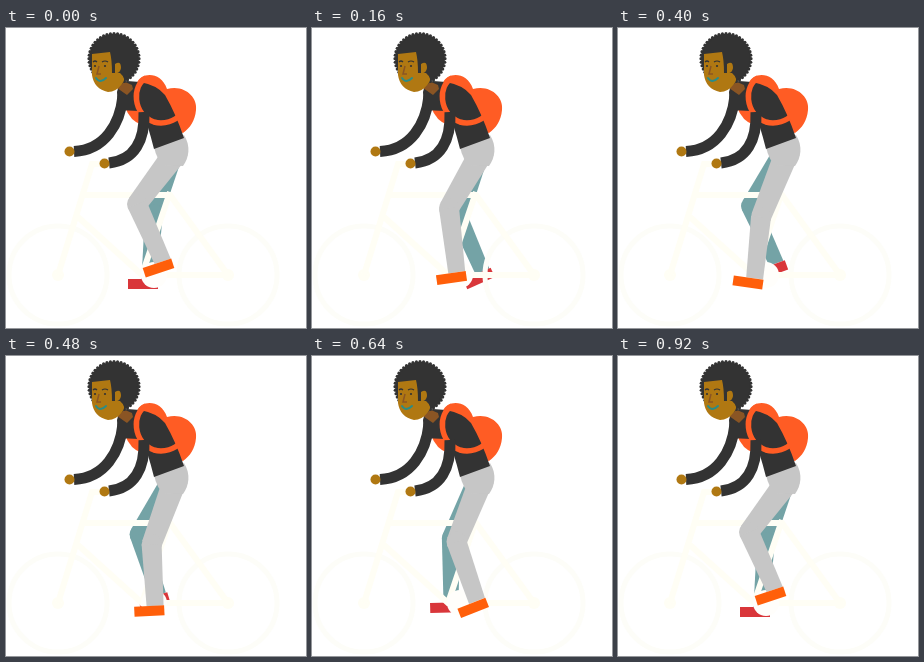
Recreate the animation shown at these times as an HTML page with a canvas. Size 300 by 300 pixels, loop 960 ms.

```html
<!DOCTYPE html>
<html lang="en">
<head>
<meta charset="utf-8">
<title>Cyclist</title>
<style>
  html, body { margin: 0; width: 100%; height: 100%; overflow: hidden; background: #fff; }
  canvas { display: block; width: 300px; height: 300px; }
</style>
</head>
<body>
<canvas id="stage" width="300" height="300"></canvas>
<script>
const ctx = document.getElementById('stage').getContext('2d');
const DARK = '#333', SKIN = '#b07812', BROWN = '#8a5524', ORANGE = '#ff5c24';
const GRAY = '#c6c6c6', BIKE = '#fffef5';
const LOOP = 960, CYCLE = 920, STEP = 40;

// Pose keys: knee x, knee y, shoe centre x, shoe centre y, shoe angle in degrees
const times = [0, 160, 280, 400, 560, 760];
const frontLeg = {
  color: GRAY, shoe: '#ff5f0a', hip: [168, 127], hipR: 12, kneeR: 10, hem: 8.5,
  keys: [
    [131, 176, 152.5, 240, -18], [137, 180, 139.5, 250, -8], [142, 187, 130.5, 252.5, 2],
    [143, 189, 130, 254.5, 8], [147, 187, 156.5, 254.5, -15], [138.5, 183, 162, 246.5, -26]
  ]
};
const rearLeg = {
  color: '#74a3a6', shoe: '#d9363a', hip: [166, 125], hipR: 11, kneeR: 9, hem: 7.5,
  keys: [
    [148, 185, 137, 256, 0], [147, 190, 167, 250.5, -24], [138, 183, 162, 246.5, -28],
    [132, 178, 154.4, 242, -20], [135, 180, 141.7, 249.4, -12], [145, 185, 123.7, 254, 12]
  ]
};

// Smooth periodic interpolation through the pose keys
function poseAt(keys, t) {
  const n = times.length;
  const wrap = i => (i + n) % n;
  const timeOf = i => times[wrap(i)] + Math.floor(i / n) * CYCLE;
  let i = n - 1;
  while (times[i] > t) i--;
  const span = timeOf(i + 1) - timeOf(i), u = (t - timeOf(i)) / span;
  return keys[i].map((a, k) => {
    const at = j => keys[wrap(j)][k];
    const slope = j => (at(j + 1) - at(j - 1)) / (timeOf(j + 1) - timeOf(j - 1)) * span;
    const b = at(i + 1), m0 = slope(i), m1 = slope(i + 1);
    return a + u * (m0 + u * (3 * (b - a) - 2 * m0 - m1 + u * (2 * (a - b) + m0 + m1)));
  });
}

function fill(d, color) {
  ctx.fillStyle = color;
  ctx.fill(new Path2D(d));
}

function stroke(d, color, width, cap = 'butt') {
  ctx.strokeStyle = color;
  ctx.lineWidth = width;
  ctx.lineCap = cap;
  ctx.stroke(new Path2D(d));
}

function disc(x, y, r, color) {
  ctx.fillStyle = color;
  ctx.beginPath();
  ctx.arc(x, y, r, 0, 2 * Math.PI);
  ctx.fill();
}

function polygon(points, color) {
  fill('M' + points.map(p => p.join(' ')).join('L') + 'Z', color);
}

function drawLeg(leg, t) {
  const [kx, ky, sx, sy, degrees] = poseAt(leg.keys, t);
  const [hx, hy] = leg.hip;
  const angle = degrees * Math.PI / 180, c = Math.cos(angle), s = Math.sin(angle);
  const onShoe = (x, y) => [sx + x * c - y * s, sy + x * s + y * c];
  const [ax, ay] = onShoe(6, -5);
  const side = (x, y, dx, dy, w) => {
    const len = Math.hypot(dx, dy);
    return [x + dy / len * w, y - dx / len * w];
  };
  const tx = kx - hx, ty = ky - hy, lx = ax - kx, ly = ay - ky;

  disc(hx, hy, leg.hipR, leg.color);
  polygon([
    side(hx, hy, tx, ty, leg.hipR), side(kx, ky, tx, ty, leg.kneeR),
    side(kx, ky, tx, ty, -leg.kneeR), side(hx, hy, tx, ty, -leg.hipR)
  ], leg.color);
  disc(kx, ky, leg.kneeR, leg.color);
  polygon([
    side(kx, ky, lx, ly, leg.kneeR), onShoe(6 + leg.hem, -5),
    onShoe(6 - leg.hem, -5), side(kx, ky, lx, ly, -leg.kneeR)
  ], leg.color);
  polygon([onShoe(-15, -5), onShoe(15, -5), onShoe(15, 5), onShoe(-15, 5)], leg.shoe);
}

function drawBike() {
  for (const x of [52, 222]) {
    ctx.strokeStyle = '#fdfdf8';
    ctx.lineWidth = 5;
    ctx.beginPath();
    ctx.arc(x, 247, 49, 0, 2 * Math.PI);
    ctx.stroke();
    disc(x, 247, 6, BIKE);
  }
  stroke('M96 136L86 136L52 247M79 167H164L222 247H136L72 189M164 164L136 247', BIKE, 6);
  disc(148, 247, 13, '#fffefb');
}

function drawBody() {
  fill('M148 119L178 107C185 118 183 130 177 138L158 137Q151 133 148 119Z', GRAY);

  // Backpack and far arm
  fill('M131 55C135 44 155 43 161 61C178 56 192 69 190 82C189 93 184 100 177 105L150 97Z', ORANGE);
  fill('M119 79L137 79L136 97Q124 93 119 79Z', ORANGE);
  stroke('M117 68C114 96 99 122 68 123.5', DARK, 11);
  disc(63.5, 123.5, 5, SKIN);

  // Torso, strap and near arm
  fill('M111 64Q113 54 121 53L134 54Q151 57 159 67Q170 86 178 110L148 121Q145 109 141 96L133 83L112 82Z', DARK);
  stroke('M140 50C126 57 126 86 148 94C158 97 169 93 175 86', ORANGE, 5.5);
  stroke('M138 84C139 112 129 132 103 135', DARK, 11);
  disc(98.5, 135.5, 5, SKIN);
}

function drawHead() {
  fill('M110 50L126 57L127 61L121 67L111 60Z', BROWN);
  disc(108, 30.7, 25, DARK);
  for (let i = 0; i < 44; i++) {
    const a = i * Math.PI / 22;
    disc(108 + 25 * Math.cos(a), 30.7 + 25 * Math.sin(a), 1.6, DARK);
  }
  fill('M86 26L104 24Q106 32 106 45L114 45Q121 51 116 56Q110 64 102 64Q88 61 86 47Z', SKIN);
  fill('M109 36Q115 32 115 40Q114 46 109 45Z', SKIN);
  stroke('M93 38L91 46H95', BROWN, 1.5);
  stroke('M87 34Q89 32 91 34M96 34Q99 32 102 34', DARK, 1.2);
  disc(89, 38, 1.1, DARK);
  disc(99, 38, 1.1, DARK);
  stroke('M90 50Q94 56 100 50', '#2b8c86', 2, 'round');
}

function draw(now) {
  const t = Math.floor(now % LOOP / STEP) * STEP % CYCLE;
  ctx.fillStyle = '#fff';
  ctx.fillRect(0, 0, 300, 300);
  drawLeg(rearLeg, t);
  drawBike();
  drawLeg(frontLeg, t);
  drawBody();
  drawHead();
}

const start = performance.now();
function tick() {
  draw(performance.now() - start);
  requestAnimationFrame(tick);
}
tick();
</script>
</body>
</html>
```
